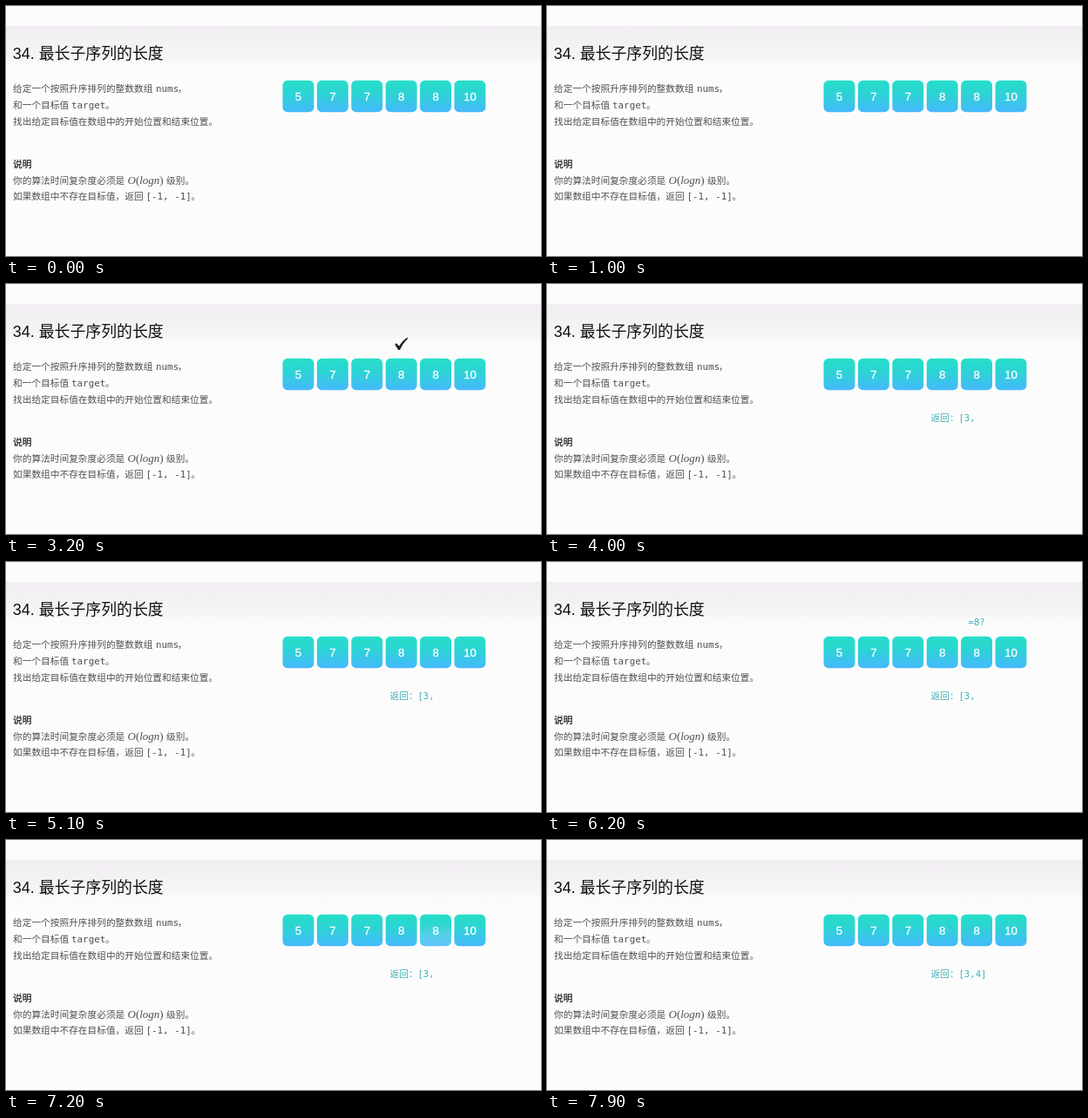
Animation of 614 by 288 pixels, one loop 8000 ms. Source, as an HTML page:

```html
<!DOCTYPE html>
<html lang="zh-CN">
<head>
<meta charset="utf-8">
<style>
html, body { margin: 0; width: 100%; height: 100%; overflow: hidden; background: #fcfcfc; }
svg { display: block; width: 614px; height: 288px; }
text { font: 10.7px "Noto Sans CJK SC", "Noto Sans CJK", sans-serif; fill: #505050; white-space: pre; }
.title { font: 17.9px "Liberation Sans", "Noto Sans CJK SC", "Noto Sans CJK", sans-serif; fill: #111; }
.head { fill: #222; stroke: #222; stroke-width: .25; }
.mono { font: 10.9px "DejaVu Sans Mono", monospace; }
.math { font: italic 13px "Liberation Serif", serif; }
.up { font-style: normal; }
.num { font: 13.2px "Liberation Sans", sans-serif; fill: #fff; stroke: #fff; stroke-width: .3; text-anchor: middle; }
.teal { fill: #3fb0b6; }
.small { font-size: 10.6px; }
</style>
</head>
<body>
<svg viewBox="0 0 614 288">
  <defs>
    <linearGradient id="band" x1="0" y1="0" x2="0" y2="1">
      <stop offset="0" stop-color="#f1edf2"/>
      <stop offset=".3" stop-color="#f3f1f4"/>
      <stop offset=".62" stop-color="#f6f5f8"/>
      <stop offset=".66" stop-color="#fafafb"/>
      <stop offset="1" stop-color="#fcfcfc"/>
    </linearGradient>
    <linearGradient id="cell" x1="0" y1="0" x2="0" y2="1">
      <stop offset="0" stop-color="#25dec8"/>
      <stop offset=".4" stop-color="#2cd4d3"/>
      <stop offset="1" stop-color="#45b9fc"/>
    </linearGradient>
    <linearGradient id="shine" x1="0" y1="0" x2="0" y2="1">
      <stop offset=".3" stop-color="#fff" stop-opacity="0"/>
      <stop offset=".6" stop-color="#fff"/>
    </linearGradient>
  </defs>
  <rect width="614" height="288" fill="#fcfcfc"/>
  <rect y="23" width="614" height="63" fill="url(#band)"/>

  <text class="title" x="7.8" y="61">34. 最长子序列的长度</text>
  <text x="8" y="99">给定一个按照升序排列的整数数组</text>
  <text class="mono" x="172" y="99">nums</text>
  <text x="197" y="99">，</text>
  <text x="8" y="118">和一个目标值</text>
  <text class="mono" x="75" y="118">target</text>
  <text x="114" y="118">。</text>
  <text x="8" y="137">找出给定目标值在数组中的开始位置和结束位置。</text>
  <text class="head" x="8" y="186">说明</text>
  <text x="8" y="205">你的算法时间复杂度必须是</text>
  <text class="math" x="139.5" y="205">O<tspan class="up">(</tspan>logn<tspan class="up">)</tspan></text>
  <text x="184" y="205">级别。</text>
  <text x="8" y="223">如果数组中不存在目标值，返回</text>
  <text class="mono" x="160.4" y="223">[-1, -1]</text>
  <text x="212.4" y="223">。</text>

  <g id="cells"></g>

  <text id="ask" class="mono teal small" y="73">=8?</text>
  <path id="tick" d="M446.2 69.6 L448.2 68.2 L451 71.6 Q454.8 65.6 460 61.8 L461.4 62.6 Q455.4 68.4 452 76 L450.2 76 Z" fill="#222"/>
  <g id="first">
    <text class="teal" x="440.5" y="157.5">返回：</text>
    <text class="mono teal small" x="472.4" y="157.5">[3,</text>
  </g>
  <text id="last" class="mono teal small" x="491.7" y="157.5">4]</text>
</svg>
<script>
const LOOP = 8000, PITCH = 39.4;
const $ = id => document.getElementById(id);
const NS = "http://www.w3.org/2000/svg";

function add(name, attrs, text = "") {
  const el = document.createElementNS(NS, name);
  for (const key in attrs) el.setAttribute(key, attrs[key]);
  el.textContent = text;
  return $("cells").appendChild(el);
}

const glow = [5, 7, 7, 8, 8, 10].map((value, i) => {
  const x = 317.5 + i * PITCH;
  const box = { x, y: 85.8, width: 35.9, height: 36.4, rx: 5.5 };
  add("rect", { ...box, fill: "url(#cell)" });
  const shine = add("rect", { ...box, fill: "url(#shine)", opacity: 0 });
  add("text", { class: "num", x: x + 18, y: 109 }, value);
  return shine;
});

// Opacity spans: [fade-in start, fade-out start, cell index]
const asks = [[2300, 2800, 3], [6000, 6450, 4]];
const ticks = [[2850, 3350, 3], [6550, 7000, 4]];
const FADE = 150;

const ramp = (t, start, len) => Math.min(1, Math.max(0, (t - start) / len));
const level = (t, [on, off]) => ramp(t, on, FADE) - ramp(t, off, FADE);

function show(el, spans, t, place) {
  const span = spans.find(s => level(t, s) > 0);
  el.setAttribute("opacity", span ? level(t, span) : 0);
  if (span) place(span[2]);
}

function draw(now) {
  const t = now % LOOP;
  show($("ask"), asks, t, i => $("ask").setAttribute("x", 326 + i * PITCH));
  show($("tick"), ticks, t, i =>
    $("tick").setAttribute("transform", `translate(${(i - 3) * PITCH} 0)`));
  $("first").setAttribute("opacity", ramp(t, 3600, 200));
  $("last").setAttribute("opacity", ramp(t, 7450, 200));
  glow[4].setAttribute("opacity", 0.14 * (ramp(t, 7050, 120) - ramp(t, 7250, 150)));
  requestAnimationFrame(draw);
}
requestAnimationFrame(draw);
</script>
</body>
</html>
```
